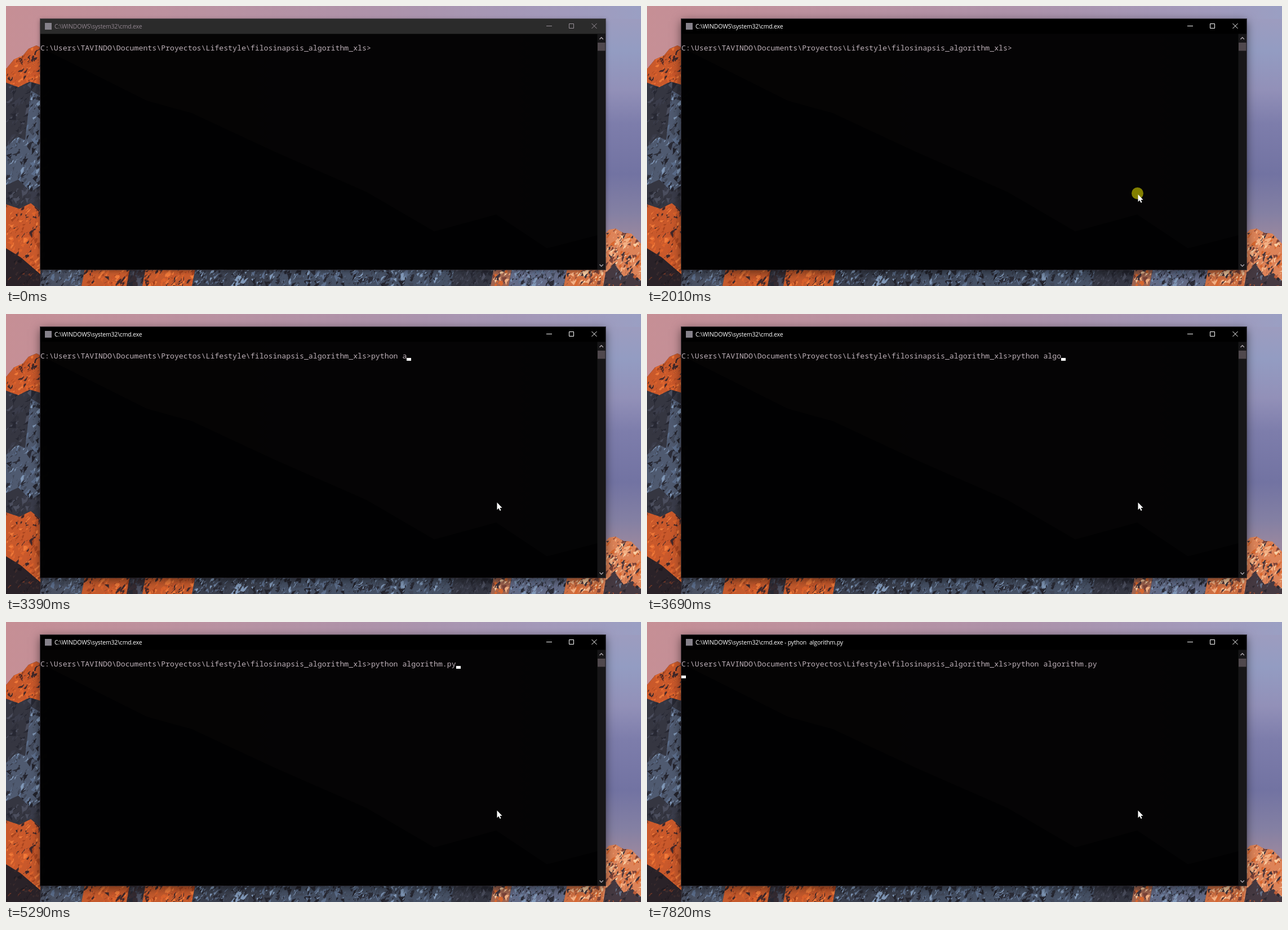
Recreate the animation shown at these times as an HTML page with a canvas. Size 1127 by 497 pixels, loop 8 s.

```html
<!DOCTYPE html>
<html lang="es">
<head>
<meta charset="utf-8">
<title>Console</title>
<style>
  html, body { margin: 0; width: 100%; height: 100%; overflow: hidden; background: #33333f; }
  #stage { position: relative; width: 1127px; height: 497px; overflow: hidden; }
  canvas, svg { position: absolute; left: 0; top: 0; display: block; }
  #shadow {
    position: absolute; left: 61px; top: 23px; width: 1003px; height: 445px;
    box-shadow: 0 0 0 1px rgba(58, 54, 60, .7), 0 2px 8px rgba(0, 0, 0, .4);
  }
  .active #shadow { box-shadow: 0 0 0 1px rgba(40, 37, 44, .75), 0 4px 16px rgba(0, 0, 0, .55); }
  text { white-space: pre; font-variant-ligatures: none; }
  #bar { fill: #2b2b2b; }
  .active #bar { fill: #000; }
  #title { font: 10.5px "Open Sans", "Noto Sans", sans-serif; letter-spacing: -.18px; fill: #91858f; }
  .active #title { fill: #fff; }
  #icon { fill: #85818a; }
  #buttons { fill: none; stroke: #999199; stroke-width: 1; }
  .active #buttons { stroke: #fff; }
  #line { font: 300 13.22px "Noto Sans Mono", "DejaVu Sans Mono", monospace; fill: #bdb0b8; }
  #arrows { fill: none; stroke: #aaa4aa; stroke-width: 1.5; }
</style>
</head>
<body>
<div id="stage">
  <canvas id="wall" width="1127" height="497"></canvas>
  <div id="shadow"></div>
  <svg width="1127" height="497" viewBox="0 0 1127 497">
    <rect x="61" y="49" width="1003" height="419" fill="#000" fill-opacity=".972"/>
    <rect id="bar" x="61" y="23" width="1003" height="26.5"/>
    <rect id="icon" x="69" y="30" width="12" height="12"/>
    <text id="title" x="86" y="39.7"></text>
    <path id="buttons" d="M959 35.5h10M999.5 31.5h8v8h-8zM1039.5 31l9 9M1048.5 31l-9 9"/>
    <rect x="1049.5" y="49.5" width="14.5" height="418.5" fill="#171618"/>
    <rect x="1050" y="65" width="13.5" height="14.5" fill="#4f484d"/>
    <path id="arrows" d="M1053.5 59l3.2-3.2 3.2 3.2M1053.5 458.8l3.2 3.2 3.2-3.2"/>
    <text id="line" x="61" y="78.5"></text>
    <rect id="caret" width="8" height="5" fill="#fff"/>
    <circle id="click" cx="870.5" cy="332.5" r="10.5" fill="#827f00"/>
    <path id="mouse" d="M.5 .5V13.6L3.5 10.8 5.6 15.2 7.5 14.4 5.6 10H9.6Z" fill="#fff"/>
  </svg>
</div>
<script>
const $ = id => document.getElementById(id);
const ctx = $('wall').getContext('2d');

let seed = 11;
const rnd = (a, b) => {
  seed = (seed * 16807) % 2147483647;
  return a + (b - a) * seed / 2147483647;
};

function gradient(x, y, stops) {
  const g = ctx.createLinearGradient(0, 0, x, y);
  stops.forEach(([at, color]) => g.addColorStop(at, color));
  return g;
}

// Fills a shape and scatters thin ridges of rock or snow inside it.
function rock(d, base, colors, n, x, y, w, h, size) {
  const shape = new Path2D(d);
  ctx.save();
  ctx.fillStyle = base;
  ctx.fill(shape);
  ctx.clip(shape);
  for (let i = 0; i < n; i++) {
    const s = size * rnd(.25, 1);
    let px = rnd(x, x + w), py = rnd(y, y + h);
    ctx.fillStyle = colors[i % colors.length];
    ctx.beginPath();
    ctx.moveTo(px, py);
    for (let k = 0; k < 3; k++) ctx.lineTo(px += s * rnd(0, .5), py -= s * rnd(-.1, .5));
    for (let k = 0; k < 4; k++) ctx.lineTo(px -= s * rnd(-.1, .4), py += s * rnd(0, .5));
    ctx.fill();
  }
  ctx.restore();
}

function paintWall() {
  ctx.fillStyle = gradient(1127, 0, [[0, '#c68f95'], [.3, '#bb92a1'], [.6, '#ad93ab'], [.88, '#a29abc'], [1, '#9a9fc3']]);
  ctx.fillRect(0, 0, 1127, 497);
  ctx.fillStyle = gradient(0, 497, [[.04, '#9d9cbf'], [.16, '#939cc2'], [.3, '#9290b8'], [.42, '#7d7dab'],
    [.6, '#7273a2'], [.74, '#8480a3'], [.82, '#98879f']]);
  ctx.fillRect(1064, 23, 63, 474);

  const slate = ['#262732', '#4b4e5e', '#3a3c4a', '#2f303b'];
  const snow = ['#8098b8', '#2b2c37', '#5d6f8d', '#23232c', '#414859'];
  const fire = ['#f07a3a', '#a8441f', '#dd632c', '#40282a', '#c9562a'];
  const peach = ['#f3b084', '#d8672f', '#f8cda2', '#7b4338', '#3d333c'];

  rock('M0 112L14 95 30 88 40 76 54 70 250 168 330 190 480 260 640 330 760 400 870 370 960 430 1064 403 1127 428V497H0Z',
    '#353641', slate, 300, 0, 130, 62, 367, 16);
  rock('M0 112L14 95 30 88 40 76 54 70 62 74V140L42 134 22 144 0 136Z', '#c9592b', fire, 150, 0, 75, 62, 70, 11);
  rock('M0 250L20 232 34 238 44 150 61 160V318L44 330 22 308 0 318Z', '#4f5a70', snow, 240, 0, 150, 62, 185, 12);
  rock('M0 352L24 360 44 350 61 364V480L42 462 24 448 0 432Z', '#c9592b', fire, 200, 0, 350, 62, 125, 12);
  rock('M0 430L26 446 61 476V497H0Z', '#2a2228', ['#392b2d', '#1f1a20', '#6b3527'], 50, 0, 435, 62, 62, 10);

  // Foot of the range below the window.
  const foot = [
    [60, 134, '#4a5162', snow], [134, 214, '#c55a2c', fire], [214, 242, '#352b31', slate],
    [242, 330, '#c55a2c', fire], [330, 470, '#3a3f4d', snow], [470, 790, '#465165', snow],
    [790, 860, '#343743', slate], [860, 892, '#a0644f', peach], [892, 990, '#626a86', snow],
    [990, 1066, '#cf6f42', peach]
  ];
  for (const [a, b, base, colors] of foot)
    rock(`M${a} 497L${a + 6} 466H${b + 6}L${b} 497Z`, base, colors, (b - a) * 1.2, a, 466, b - a, 31, 11);

  rock('M1060 408L1070 397 1082 395 1096 403 1110 404 1127 422V497H1060Z', '#dd8358', peach, 190, 1062, 398, 65, 100, 12);
  rock('M1064 474L1080 458 1096 480 1112 474 1127 488V497H1060Z', '#453941', ['#b85b38', '#2d2830', '#667086'], 50, 1062, 455, 65, 42, 10);
}

const LOOP = 8000;
const COLS = 7.932;
const PROMPT = 'C:\\Users\\TAVINDO\\Documents\\Proyectos\\Lifestyle\\filosinapsis_algorithm_xls>';
const COMMAND = 'python algorithm.py';
const KEYS = [2450, 2720, 2870, 2920, 3070, 3250, 3320, 3390, 3470, 3540, 3690,
  4080, 4180, 4330, 4380, 4580, 4830, 5060, 5290];
const CARET_OFF = [[0, 2450], [2570, 2720], [3610, 3690], [4680, 4830], [5180, 5290],
  [5720, 5800], [6250, 6780], [7320, 7820]];
const ENTER = 5800;

const within = (t, [a, b]) => t >= a && t < b;
const show = (id, on) => $(id).setAttribute('visibility', on ? 'visible' : 'hidden');

function render(t) {
  const typed = KEYS.filter(k => k <= t).length;
  $('stage').className = t >= 2010 ? 'active' : '';
  $('title').textContent = 'C:\\WINDOWS\\system32\\cmd.exe' + (t >= 5940 ? ' - python  algorithm.py' : '');
  $('line').textContent = PROMPT + COMMAND.slice(0, typed);

  const entered = t >= ENTER;
  const col = entered ? 0 : PROMPT.length + typed;
  $('caret').setAttribute('x', Math.round(61 + col * COLS - .1));
  $('caret').setAttribute('y', entered ? 95 : 78);
  show('caret', !CARET_OFF.some(span => within(t, span)));

  // The pointer glides in with nine sampled positions.
  const p = Math.min(8, Math.max(0, Math.floor((t - 20) / 47.5))) / 8;
  const rest = (1 - p) ** 2;
  $('mouse').setAttribute('transform', `translate(${871 + 153 * rest} ${334 + 121 * rest})`);
  show('mouse', t >= 20);
  show('click', within(t, [2010, 2170]));
}

function tick() {
  render(performance.now() % LOOP);
  requestAnimationFrame(tick);
}

paintWall();
tick();
</script>
</body>
</html>
```
